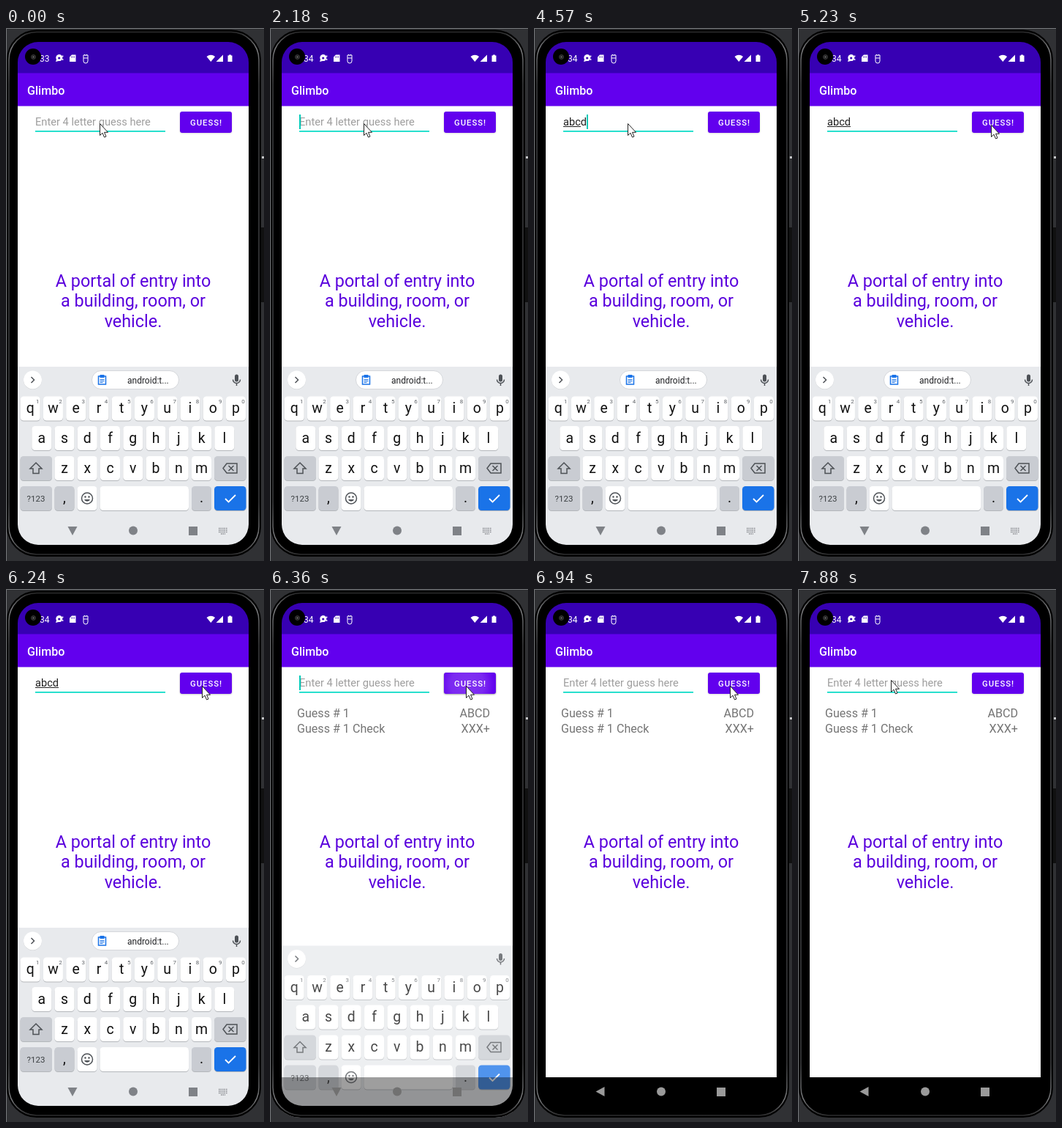
Animation of 353x727 px, one loop 8 s. Source, as an HTML page:

```html
<!DOCTYPE html>
<html lang="en">
<head>
<meta charset="utf-8">
<title>Word guessing app</title>
<style>
  html, body { margin: 0; width: 100%; height: 100%; overflow: hidden; background: #303134; }
  svg { display: block; font-family: Roboto, sans-serif; }
  .medium { font-weight: 500; fill: #fff; }
  .mid { text-anchor: middle; }
  .icon { fill: none; stroke: #4d5156; stroke-width: 1.5; }
  .key { fill: #fff; }
  .dark { fill: #c9ccd2; }
  .blue { fill: #1a73e8; }
  .letter { font-size: 19.4px; fill: #111; text-anchor: middle; }
  .digit { font-size: 8px; fill: #5f6368; text-anchor: middle; }
  .clue { font-size: 23.4px; fill: #5a00dd; text-anchor: middle; }
  .field { font-size: 14.65px; }
  .result { font-size: 16.1px; fill: #757575; }
</style>
</head>
<body>
<svg width="353" height="727" viewBox="0 0 353 727">
  <defs>
    <clipPath id="buttonShape"><rect x="238" y="114" width="71" height="29" rx="3"/></clipPath>
    <radialGradient id="glow">
      <stop stop-color="#fff"/><stop offset=".6" stop-color="#fff" stop-opacity=".8"/>
      <stop offset="1" stop-color="#fff" stop-opacity="0"/>
    </radialGradient>
    <linearGradient id="metal" x2="0" y2="1">
      <stop stop-color="#2c2c2d"/><stop offset=".03" stop-color="#77787a"/>
      <stop offset=".1" stop-color="#3c3d3f"/><stop offset=".9" stop-color="#3c3d3f"/>
      <stop offset=".97" stop-color="#77787a"/><stop offset="1" stop-color="#2c2c2d"/>
    </linearGradient>
    <filter id="soft" x="-20%" y="-40%" width="140%" height="180%"><feGaussianBlur stdDeviation="1.2"/></filter>
  </defs>

  <!-- app -->
  <rect x="16" y="19" width="316" height="686" fill="#fff"/>
  <rect x="16" y="61" width="316" height="45.500" fill="#6200ee"/>
  <rect x="16" y="19" width="316" height="42.500" fill="#3700b3"/>

  <!-- status bar -->
  <text id="clock" x="59.4" y="45.5" font-size="12" fill="#fff" text-anchor="end"></text>
  <g fill="#fff">
    <path d="M68 46l1-3a4.500 4.500 0 1 1 3 2z"/>
    <circle cx="72.700" cy="41" r="1.600" fill="#3700b3"/>
    <circle cx="77.500" cy="38.500" r="1"/><circle cx="77.500" cy="43" r="1"/>
    <path d="M90 36.500h5.500v9.500h-8.500v-6.500z"/>
    <path d="M89.500 38.500v2m2-2v2m2-2v2" stroke="#3700b3" stroke-width=".8"/>
    <path d="M106 37h6v8a3 3 0 0 1-6 0zM106 41h6M107 36l1.500 1.500M111 36l-1.500 1.500" fill="none" stroke="#fff"/>
    <path d="M274.500 39q5.800-4.600 11.600 0l-5.800 7z"/>
    <path d="M297 36.500v9.500h-9.500z"/>
    <path d="M303.500 37.500h1.500v-1h3v1h1.500v8.500h-6z"/>
  </g>
  <circle cx="37" cy="39" r="11"/>
  <circle cx="37.500" cy="39.500" r="3" fill="#222" stroke="#444" stroke-width=".8"/>
  <circle cx="37.500" cy="39.500" r="1" fill="#777"/>
  <text x="29" y="90.500" font-size="16.1" class="medium">Glimbo</text>

  <!-- form -->
  <text id="hint" class="field" x="40" y="133.300" fill="#9e9e9e">Enter 4 letter guess here</text>
  <text id="typed" class="field" x="40" y="133.300" fill="#212121"></text>
  <rect id="composing" x="40" y="134" height="1" fill="#212121"/>
  <rect x="40" y="140" width="178" height="1.700" fill="#03dac5"/>
  <rect id="caret" y="118" width="2" height="20" fill="#03cab7"/>
  <rect id="shadow" x="238" y="115" width="71" height="28.500" rx="3" filter="url(#soft)"/>
  <g clip-path="url(#buttonShape)">
    <rect x="238" y="114" width="71" height="29" fill="#6200ee"/>
    <circle id="ripple" cx="270" cy="130" r="38" fill="url(#glow)"/>
  </g>
  <text x="252" y="133" font-size="11.300" letter-spacing="1" class="medium">GUESS!</text>

  <g id="results" class="result">
    <text x="37" y="174.500">Guess # 1</text><text x="301" y="174.500" text-anchor="end">ABCD</text>
    <text x="37" y="196">Guess # 1 Check</text><text x="301" y="196" text-anchor="end">XXX+</text>
  </g>
  <text class="clue" x="174" y="352.500">A portal of entry into</text>
  <text class="clue" x="174" y="380">a building, room, or</text>
  <text class="clue" x="174" y="407.500">vehicle.</text>

  <g id="keyboard"></g>

  <rect id="navBar" x="16" y="666" width="316" height="39"/>
  <g id="navIcons">
    <path id="back" d="M84.500 685.500l12-6.500v13z"/>
    <circle cx="174" cy="685.500" r="6"/>
    <rect x="250" y="680" width="12" height="12"/>
  </g>

  <!-- phone body, with a rounded opening for the app -->
  <path fill-rule="evenodd" d="M0 0H353V727H0ZM42 2.500a41 41 0 0 0-41 41V680a41 41 0 0 0 41 41H308a41 41 0 0 0 41-41V43.500a41 41 0 0 0-41-41Z" fill="#303134"/>
  <path fill-rule="evenodd" d="M42 2.500a41 41 0 0 0-41 41V680a41 41 0 0 0 41 41H308a41 41 0 0 0 41-41V43.500a41 41 0 0 0-41-41ZM44 19H304a28 28 0 0 1 28 28V677a28 28 0 0 1-28 28H44a28 28 0 0 1-28-28V47a28 28 0 0 1 28-28Z"/>
  <rect x="4" y="5.500" width="342" height="712.500" rx="38" fill="none" stroke="url(#metal)" stroke-width="1.500"/>
  <path d="M.5 727V.5H353" fill="none" stroke="#77797c"/>
  <rect x="350" y="175" width="3" height="3" fill="#c4c5c7"/>
  <rect x="349" y="272" width="4" height="102" fill="#111"/>

  <path id="mouse" d="M.5.500V16.500L4 13.200 6.500 19 9 18 6.500 12.300H11.500Z" fill="#fff" stroke="#222"/>
</svg>

<script>
const $ = id => document.getElementById(id);

// Keyboard
const key = (x, y, w = 27, kind = "") =>
  `<rect x="${x}" y="${y + 1}" width="${w}" height="33" rx="4.5" fill="#b4b7bb"/>
   <rect class="key ${kind}" x="${x}" y="${y}" width="${w}" height="33" rx="4.5"/>`;

const letterRow = (letters, left, y, digits = "") => [...letters].map((letter, i) => {
  const cx = left + i * 31.25;
  const digit = digits && `<text class="digit" x="${cx + 10}" y="${y + 9}">${digits[i]}</text>`;
  return key(cx - 13.5, y) + `<text class="letter" x="${cx}" y="${y + 22.5}">${letter}</text>` + digit;
}).join("");

$("keyboard").innerHTML = `
  <rect x="16" y="462" width="316" height="243" fill="#e8eaed"/>
  <circle cx="36.5" cy="480.5" r="12.5" fill="#c9cccf"/><circle cx="36.5" cy="480" r="12.5" fill="#fff"/>
  <path class="icon" d="M34.5 476l4 4-4 4"/>
  <g id="clipboard">
    <rect x="117.5" y="467.5" width="119" height="25" rx="12.5" fill="#fff" stroke="#d5d7db"/>
    <path d="M126.5 475h10v11h-10z" fill="none" stroke="#1a73e8" stroke-width="1.5"/>
    <path d="M128.5 473h6v4h-6z" fill="#1a73e8"/>
    <path d="M128.5 479.5h6m-6 2h6m-6 2h4" stroke="#1a73e8"/>
    <text x="166" y="484.5" font-size="12" fill="#202124">android:t...</text>
  </g>
  <rect x="313" y="472.5" width="5" height="10" rx="2.5" fill="#4d5156"/>
  <path class="icon" d="M310.5 479.5a5 5 0 0 0 10 0M315.5 484.5v3.5"/>
  ${letterRow("qwertyuiop", 33.2, 502.5, "1234567890")}
  ${letterRow("asdfghjkl", 48.8, 543)}
  ${letterRow("zxcvbnm", 80, 584)}
  ${key(19.5, 584, 43.5, "dark")}${key(285, 584, 43.5, "dark")}
  <path class="icon" d="M41 593l8 8h-4v6.5h-8v-6.5h-4z"/>
  <path class="icon" d="M302 594h14v13h-14l-5-6.5zM304.5 597l7 7m0-7l-7 7"/>
  ${key(19.5, 625, 43.5, "dark")}${key(66.5, 625, 27, "dark")}${key(97.5, 625)}
  ${key(128.5, 625, 121.5)}${key(254, 625, 27, "dark")}${key(285, 625, 43.5, "blue")}
  <text class="mid" x="41" y="646" font-size="11.5" fill="#3c4043">?123</text>
  <text class="letter" x="80" y="647">,</text><text class="letter" x="267.5" y="647">.</text>
  <circle class="icon" cx="111" cy="641.5" r="7.5"/>
  <circle cx="108.5" cy="639.5" r="1.2" fill="#4d5156"/><circle cx="113.5" cy="639.5" r="1.2" fill="#4d5156"/>
  <path d="M107 643a4.3 4.3 0 0 0 8 0z" fill="#4d5156"/>
  <path d="M300 642l4.5 4.5 9.5-9.5" fill="none" stroke="#fff" stroke-width="1.8"/>
  <path id="switcher" d="M291 682.5h12m-12 2.5h12m-12 2.5h12m-9 2.5h6" stroke="#85888d" stroke-width="1.5" stroke-dasharray="1.5 1"/>`;

// Timeline: each step is [start time, ...values]
const LOOP = 8000;
const CARET_TOGGLES = [150, 740, 1160, 1620, 2180, 2680, 3140, 5230, 5810, 6240, 6360, 6790, 7370, 7880];
const CARET_X = [40, 48, 56, 64, 72];
const TYPED = [[0, 0], [3700, 1], [4100, 2], [4420, 3], [4570, 4], [6360, 0]];
const COMPOSED = [[0, 0], [3950, 1], [4420, 2], [4570, 3], [4720, 4], [6360, 0]];
const MOUSE = [
  [0, 128, 130], [4720, 129, 129], [4840, 138, 125], [4960, 174, 126], [5080, 222, 129],
  [5230, 264, 132], [5380, 268, 132],
  [7370, 266, 133], [7490, 236, 130], [7610, 186, 125], [7760, 140, 124], [7880, 127, 124]];
const RIPPLE = [[0, 0], [6360, .2], [6640, .16], [6790, .07], [6940, 0]];
const SHADOW = [[0, .2], [6240, .3], [6360, .5], [6790, .3], [6940, .2]];
// keyboard offset and opacity, navigation bar opacity, icon colour
const HIDE = [[0, 0, 1, 0, "#7f8287"], [6360, 24.5, .76, .38, "#717171"],
  [6520, 60, .2, .85, "#858585"], [6640, 80, 0, 1, "#9a9a9a"]];

const at = (steps, t) => steps.findLast(step => step[0] <= t).slice(1);
const set = (id, attributes) => {
  for (const name in attributes) $(id).setAttribute(name, attributes[name]);
};

function draw(t) {
  const [typed] = at(TYPED, t), [composed] = at(COMPOSED, t);
  const [x, y] = at(MOUSE, t);
  const [offset, opacity, bar, iconColor] = at(HIDE, t);
  const caretOn = CARET_TOGGLES.filter(time => time <= t).length % 2;

  $("clock").textContent = t < 1930 ? "33" : "34";
  $("typed").textContent = "abcd".slice(0, typed);
  set("hint", { opacity: typed ? 0 : 1 });
  set("composing", { width: CARET_X[composed] - 40 });
  set("caret", { x: CARET_X[typed], opacity: caretOn });
  set("results", { opacity: t < 6360 ? 0 : 1 });
  set("ripple", { opacity: at(RIPPLE, t)[0] });
  set("shadow", { opacity: at(SHADOW, t)[0] });
  set("keyboard", { transform: `translate(0 ${offset})`, opacity });
  set("clipboard", { opacity: offset ? 0 : 1 });
  set("switcher", { opacity: offset ? 0 : 1 });
  set("navBar", { opacity: bar });
  set("navIcons", { fill: iconColor });
  set("back", { transform: `rotate(${bar < .5 ? -90 : 0} 91 685.5)` });
  set("mouse", { transform: `translate(${x} ${y})` });
}

const start = performance.now();
function tick() {
  draw((performance.now() - start) % LOOP);
  requestAnimationFrame(tick);
}
tick();
</script>
</body>
</html>
```
